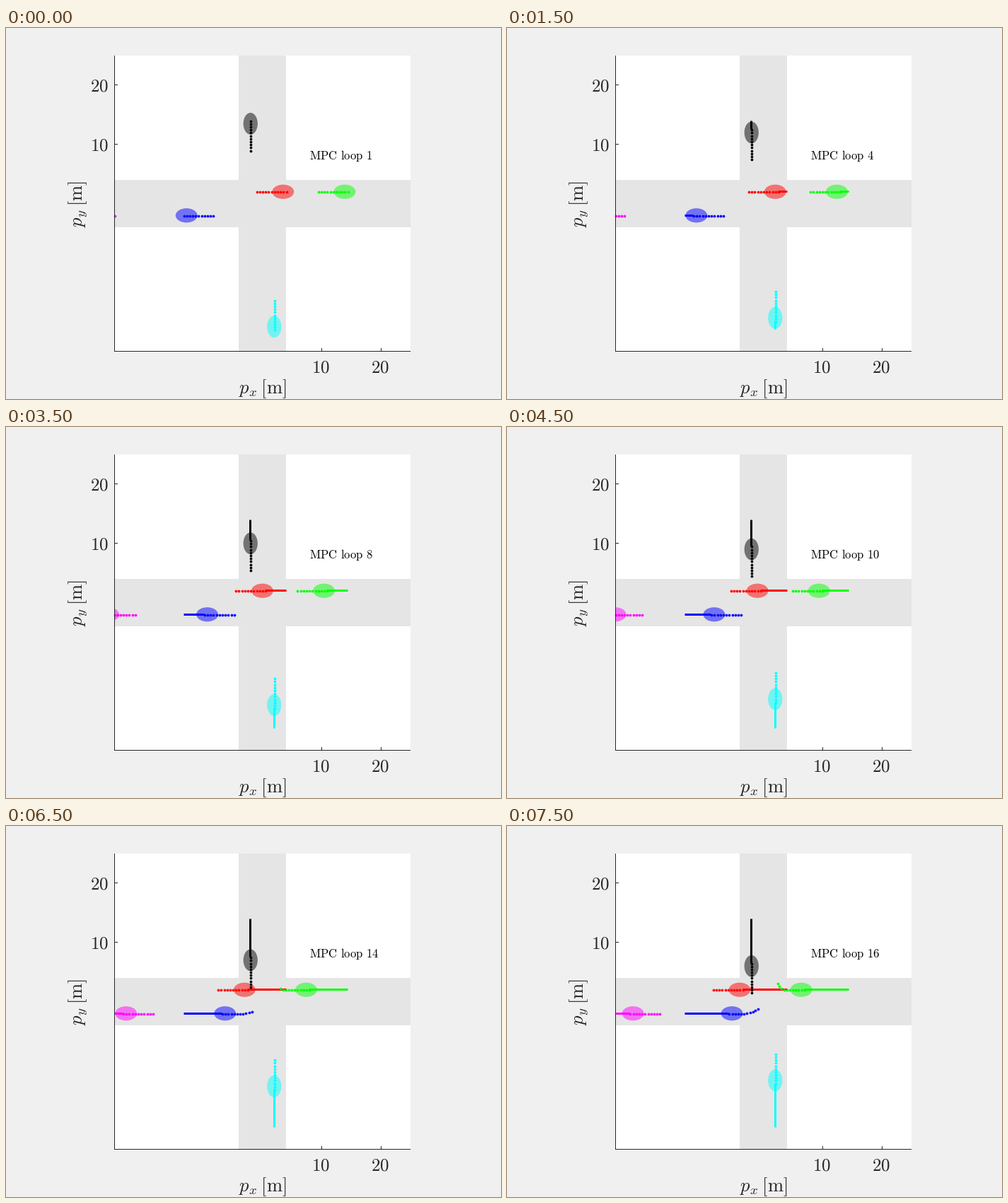
A matplotlib script for the animation above (8 s loop, 700 by 525 pixels).

```python
import numpy as np
import matplotlib.pyplot as plt
from matplotlib.animation import FuncAnimation
from matplotlib.patches import Ellipse, Rectangle

W, H, DPI = 700, 525, 100
LEFT, TOP, SIDE = 153, 39, 419
SCALE = SIDE / 50
LOOPS, STEP, HORIZON = 16, 0.5, 10
INK = "#262626"

plt.rcParams["mathtext.fontset"] = "cm"
plt.rcParams["path.snap"] = False


def px(x):
    return LEFT + (np.asarray(x) + 25) * SCALE


def py(y):
    return TOP + (25 - np.asarray(y)) * SCALE


def mid(v):
    """Centre of the pixel that holds v."""
    return np.floor(v) + 0.5


fig = plt.figure(figsize=(W / DPI, H / DPI), dpi=DPI, facecolor="#f0f0f0")
ax = fig.add_axes([0, 0, 1, 1])
ax.set_xlim(0, W)
ax.set_ylim(H, 0)
ax.axis("off")


def box(x, y, w, h, color):
    patch = Rectangle((x, y), w, h, fc=color, ec="none", lw=0, zorder=0)
    return ax.add_patch(patch)


def line(xs, ys):
    ax.plot(xs, ys, color=INK, lw=0.72, zorder=5, solid_capstyle="butt")


def label(x, y, tex, size, color=INK, **kw):
    return ax.text(x, y, tex, fontsize=size, color=color, va="baseline", **kw)


# Crossing roads and axes
area = box(LEFT, TOP, SIDE, SIDE, "white")
box(329, TOP, 67, SIDE, "#e5e5e5")
box(LEFT, 215, SIDE, 67, "#e5e5e5")
line([153.5, 153.5], [39, 458])
line([153, 572], [457.5, 457.5])
for v in (10, 20):
    tx, ty = mid(px(v)), mid(py(v))
    line([tx, tx], [453, 457])
    line([154, 158], [ty, ty])
    label(px(v) - 0.8, 488, f"${v}$", 18, ha="center")
    label(145.3, py(v) + 8.6, f"${v}$", 18, ha="right")

UNIT = r"\hspace{0.22}\mathrm{[m]}$"
label(362.5, 517.5, "$p_x" + UNIT, 19.2, ha="center")
label(108, 248.5, "$p_y" + UNIT, 19.2, ha="center", rotation=90,
      rotation_mode="anchor")
counter = label(428.7, 186, "", 12, "black", ha="left")


class Car:
    """Drives straight from start; its plan may bend upward in an arc."""

    def __init__(self, color, start, heading, bend=None, radius=1):
        self.start, self.heading = np.array(start), np.array(heading)
        self.bend, self.radius = bend, radius
        size = (30.8, 20.2) if heading[0] else (20.2, 30.8)
        self.body = ax.add_patch(
            Ellipse((0, 0), *size, fc=color, ec="none", alpha=0.5, zorder=2))
        self.trail, = ax.plot([], [], color=color, lw=2.16, zorder=3,
                              solid_capstyle="butt")
        self.plan, = ax.plot([], [], "o", color=color, ms=2.7, mew=0, zorder=4)
        for art in (self.body, self.trail):
            art.set_clip_path(area)

    def path(self, d):
        d = np.atleast_1d(d).astype(float)
        lift = np.zeros_like(d)
        if self.bend is not None:
            turn = np.maximum(d - self.bend, 0) / self.radius
            d = np.minimum(d, self.bend) + self.radius * np.sin(turn)
            lift = self.radius * (1 - np.cos(turn))
        x = self.start[0] + self.heading[0] * d
        y = self.start[1] + self.heading[1] * d + lift
        return x, y

    def update(self, loop):
        past = STEP * (loop - 1)
        x, y = self.path(past + STEP)
        self.body.center = px(x[0]), py(y[0])
        x, y = self.path([0, past])
        self.trail.set_data(mid(px(x)), mid(py(y)))
        x, y = self.path(past + STEP * np.arange(HORIZON + 1))
        seen = x >= -25.01
        self.plan.set_data(mid(px(x[seen])), mid(py(y[seen])))


cars = [
    Car("red", (4, 2), (-1, 0)),
    Car("lime", (14.4, 2), (-1, 0), bend=10.5, radius=1.7),
    Car("blue", (-13.3, -2), (1, 0), bend=9.4, radius=6.2),
    Car("black", (-2, 14), (0, -1)),
    Car("cyan", (2, -21.3), (0, 1)),
    Car("magenta", (-30, -2), (1, 0)),
]


def draw(i):
    loop = i + 1
    counter.set_text(
        rf"$\mathrm{{MPC}}\hspace{{0.38}}\mathrm{{loop}}\hspace{{0.38}}{loop}$")
    for car in cars:
        car.update(loop)
    return []


anim = FuncAnimation(fig, draw, frames=LOOPS, interval=500, repeat=True,
                     repeat_delay=0, blit=False)
plt.show()
```
